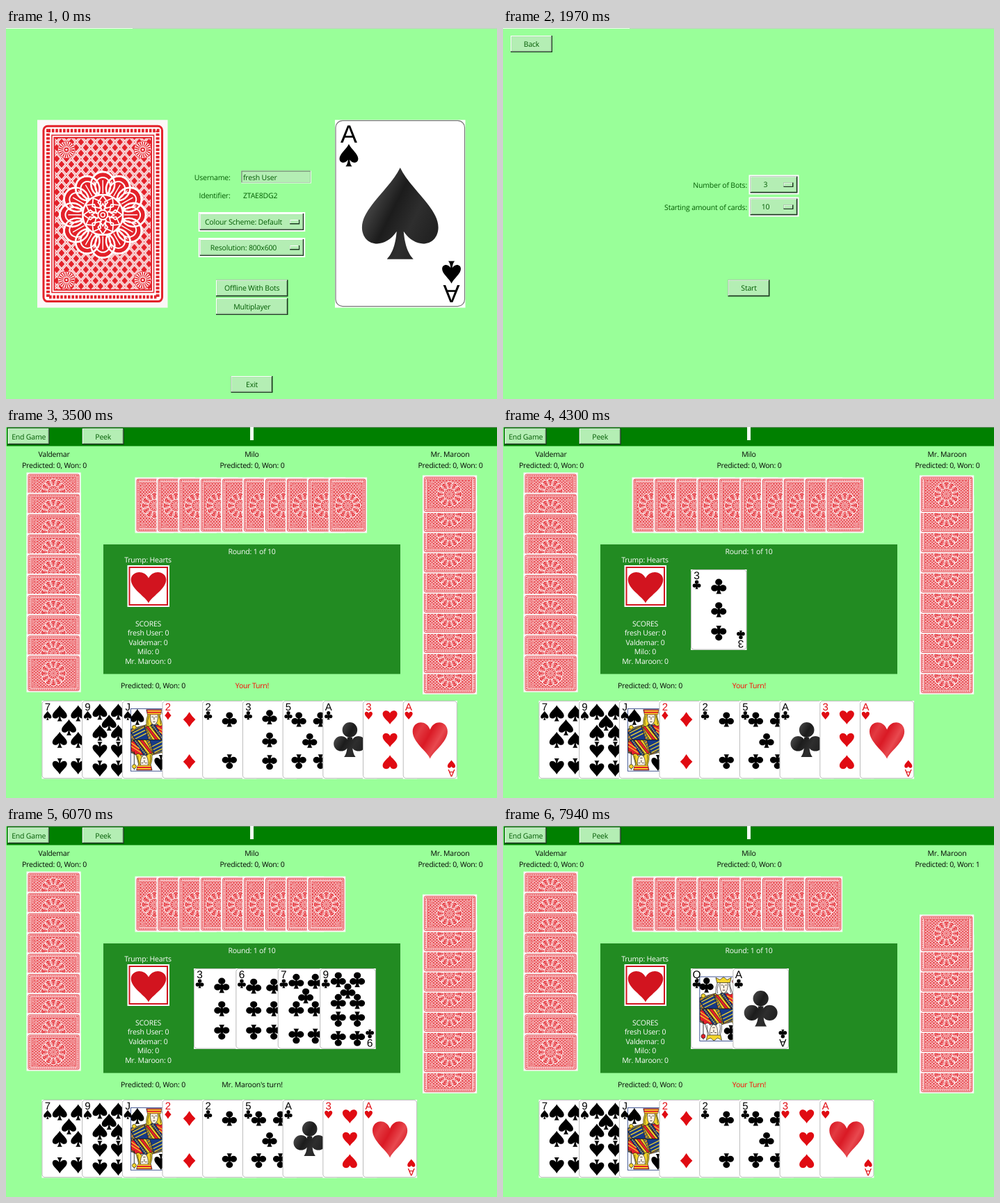
An HTML page for the animation above (8000 ms loop, 706x534 px).

```html
<!DOCTYPE html>
<html lang="en">
<head>
<meta charset="utf-8">
<title>Card game</title>
<style>
  html, body { margin: 0; width: 100%; height: 100%; overflow: hidden; background: #9f9; }
  svg { display: block; width: 706px; height: 534px; }
  text { font: 10.5px "Open Sans", "Noto Sans", sans-serif; letter-spacing: -.2px; text-rendering: geometricPrecision; }
  .rank { font: 36px "Liberation Sans", Arial, sans-serif; letter-spacing: 0; }
  .scene { visibility: hidden; animation: 8s step-end infinite; }
</style>
</head>
<body>
<svg id="stage" viewBox="0 0 706 534"></svg>
<script>
const LOOP = 8000;
const INK = '#005a00', FACE = '#b4eeb4', EDGE = '#1c3a20', RED = '#e3222a';
const YOU = 'fresh User', LEFT = 'Valdemar', TOP = 'Milo', RIGHT = 'Mr. Maroon';

const range = n => [...Array(n).keys()];
const rect = (x, y, w, h, fill, more = '') =>
  `<rect x="${x}" y="${y}" width="${w}" height="${h}" fill="${fill}" ${more}/>`;
const path = (d, fill, more = '') => `<path d="${d}" fill="${fill}" ${more}/>`;
const circle = (x, y, r, fill, more = '') => `<circle cx="${x}" cy="${y}" r="${r}" fill="${fill}" ${more}/>`;
const line = (color, width) => `stroke="${color}" stroke-width="${width}"`;
const text = (x, y, s, fill = INK, anchor = 'middle') =>
  `<text x="${x}" y="${y}" fill="${fill}" text-anchor="${anchor}">${s}</text>`;
const use = (id, transform, fill = '') =>
  `<use href="#${id}" transform="${transform}"${fill && ` fill="${fill}"`}/>`;

// Suits, about 110 units wide and centred on the origin
const SUITS = {
  S: 'M0-66C14-36 55-8 55 20C55 46 24 54 5 26C7 48 12 58 19 66H-19C-12 58-7 48-5 26C-24 54-55 46-55 20C-55-8-14-36 0-66Z',
  H: 'M0 60C-8 38-55 8-55-26C-55-58-14-66 0-32C14-66 55-58 55-26C55 8 8 38 0 60Z',
  D: 'M0-62Q18-28 46 0Q18 28 0 62Q-18 28-46 0Q-18-28 0-62Z',
  C: 'M-26-34a26 26 0 1 1 52 0a26 26 0 1 1-52 0ZM-56 14a26 26 0 1 1 52 0a26 26 0 1 1-52 0Z' +
     'M4 14a26 26 0 1 1 52 0a26 26 0 1 1-52 0ZM-9-8H9C7 35 12 50 20 60H-20C-12 50-7 35-9-8Z'
};

// Rows of pips: [height, half spread]; a zero spread is a single pip
const PIPS = {
  2: [[.24, 0], [.78, 0]],
  3: [[.21, 0], [.5, 0], [.79, 0]],
  5: [[.24, .2], [.51, 0], [.78, .2]],
  6: [[.22, .18], [.5, .18], [.79, .18]],
  7: [[.16, .17], [.34, 0], [.5, .17], [.84, .17]],
  9: [[.14, .17], [.28, 0], [.41, .17], [.63, .17], [.87, .17]]
};

const pips = (rank, suit) => PIPS[rank].map(([v, s]) => (s ? [-s, s] : [0]).map(dx =>
  use(suit, `translate(${94 + dx * 188} ${v * 271}) scale(.46 ${v > .6 ? -.42 : .42})`)).join('')).join('');

function court(rank, suit) {
  const queen = rank === 'Q', gold = '#f4d52c', navy = '#173a86', outline = line('#111', 1.5);
  const half = `<g>
    ${path('M30 136V98L82 84H138L157 92V136Z', 'url(#brocade)', outline)}
    ${path('M30 110L78 88L92 136H46Z', navy, outline)}
    ${path('M108 86L138 82L157 100V130L124 136Z', RED, outline)}
    ${path('M78 86L94 82L136 136H106Z', gold, outline)}
    ${path('M82 90L90 88L128 136H116Z', RED, outline)}
    ${path('M100 84L112 82L150 136H138Z', navy, outline)}
    ${path('M106 86L144 136', 'none', line(gold, 3) + ' stroke-dasharray="4 3"')}
    ${path('M36 112L76 92M40 122L80 102M46 132L84 113', 'none', line(gold, 3))}
    ${path('M122 92L157 114M128 106L157 126', 'none', line(gold, 3))}
    ${path('M90 46Q82 66 84 86Q98 94 104 78L122 80Q130 94 140 84Q133 64 130 46Z', queen ? '#fff' : gold, outline)}
    ${path('M93 52Q86 70 90 84M128 52Q134 70 134 82', 'none', outline)}
    ${path('M98 46Q95 80 111 84Q127 78 124 46Z', '#fff3e4', outline)}
    ${path('M102 56h6M115 56h6M111 57v9M107 73h8', 'none', line('#222', 2))}
    ${queen ? path('M88 48L84 31L98 38L110 29L122 38L136 31L132 48Z', gold, outline)
            : path('M88 48L84 31H138L134 48Z', RED, outline) + path('M88 45H135M88 36H136', 'none', line(gold, 4))}
    ${path('M146 32V96', 'none', line('#111', 2))}
    ${circle(146, 44, 7, queen ? RED : gold, outline)}${circle(42, 92, 7, gold, outline)}
    ${use(suit, 'translate(53 56) scale(.42)')}
  </g>`;
  return half + `<g transform="rotate(180 94 136)">${half}</g>` +
    rect(30, 28, 128, 216, 'none', line('#223a80', 2));
}

function face(id) {
  const [suit, rank] = id, red = 'HD'.includes(suit);
  const corner = `<text class="rank" x="20" y="33" text-anchor="middle">${rank}</text>` +
    use(suit, 'translate(20 51) scale(.245)');
  const middle = rank === 'A'
    ? use(suit, `translate(94 135) scale(${red ? 1.1 : 1})`, `url(#${red ? 'ruby' : 'coal'})`)
    : PIPS[rank] ? pips(rank, suit) : court(rank, suit);
  return `<g id="${id}" fill="${red ? '#e00b12' : '#000'}">${rect(0, 0, 188, 271, '#fff')}
    ${rect(1, 1, 186, 268, 'none', `rx="10" ${line('#777', 1.2)}`)}
    ${middle}${corner}<g transform="rotate(180 94 135.5)">${corner}</g></g>`;
}

function cardBack() {
  const white = w => line('#fff', w);
  const ring = (n, shape) => range(n).map(i => `<g transform="rotate(${i * 360 / n})">${shape}</g>`).join('');
  const oval = (y, rx, ry, fill, w) => `<ellipse cy="${y}" rx="${rx}" ry="${ry}" fill="${fill}" ${white(w)}/>`;
  const medal = ([x, y]) => circle(x, y, 12.5, '#fff', line(RED, 1)) +
    circle(x, y, 8, 'none', line(RED, 7) + ' stroke-dasharray="1.4 1.2"') +
    circle(x, y, 3.5, RED) + circle(x, y, 1.5, '#fff');
  return `<g id="back">${rect(0, 0, 188, 271, '#fbf7f7')}
    ${rect(9, 9, 171, 253, '#fff', `rx="6" ${line(RED, 3)}`)}
    ${rect(15.5, 15.5, 158, 240, 'none', line(RED, 5) + ' stroke-dasharray="3.6 1.8"')}
    ${rect(21, 22, 147, 227, '#fff', line(RED, 1.5))}
    ${rect(24.5, 25.5, 140, 220, 'url(#lattice)', line(RED, 2))}
    ${[[42, 43], [152, 43], [42, 231], [152, 231]].map(medal).join('')}
    <g transform="translate(94.5 137)">${circle(0, 0, 54, RED)}
      ${ring(12, oval(-44, 17, 18, RED, 2.5))}${circle(0, 0, 46, RED)}
      ${ring(12, oval(-44, 17, 18, 'none', 2.5))}${ring(12, oval(-41, 11, 13, 'none', 2))}
      ${ring(24, path('M0-50V-31', 'none', white(1.5)))}
      ${circle(0, 0, 29, RED, white(2.5))}${ring(12, path('M0-28L7-18L0-9L-7-18Z', 'none', white(1.8)))}
      ${ring(8, path('M0-16L5-8L0-5L-5-8Z', RED, white(1.8)))}
      ${circle(0, 0, 7, RED, white(2))}${circle(0, 0, 3, 'none', white(1.5))}
    </g></g>`;
}

function defs() {
  const cards = 'S7 S9 SJ SA D2 C2 C3 C5 C6 C7 C9 CQ CA H3 HA'.split(' ');
  const gradient = (id, ...colors) => `<linearGradient id="${id}" x2="1" y2=".6">` + colors.map((c, i) =>
    `<stop offset="${i / (colors.length - 1)}" stop-color="${c}"/>`).join('') + '</linearGradient>';
  return `<defs>
    ${gradient('coal', '#333', '#444', '#1c1c1c', '#2e2e2e', '#222')}
    ${gradient('ruby', '#d8101c', '#e23a41', '#da1a25', '#e8494f', '#d4141f')}
    <pattern id="lattice" width="14" height="16" patternUnits="userSpaceOnUse">${rect(0, 0, 14, 16, RED)}
      ${path('M0 0L14 16M14 0L0 16', 'none', line('#fff', 3.6))}
      ${path('M0 0L14 16M14 0L0 16', 'none', line(RED, .7))}</pattern>
    <pattern id="brocade" width="9" height="9" patternUnits="userSpaceOnUse" patternTransform="rotate(-35)">
      ${rect(0, 0, 9, 9, '#f4d52c')}${rect(0, 0, 9, 3, '#173a86')}${rect(0, 5, 5, 2, RED)}${rect(6, 4, 1.5, 4, '#111')}</pattern>
    ${Object.entries(SUITS).map(([id, d]) => `<path id="${id}" d="${d}"/>`).join('')}
    ${cards.map(face).join('')}${cardBack()}</defs>`;
}

const card = (id, x, y, w) => use(id, `translate(${x} ${y}) scale(${w / 188})`);
const sideBack = y => use('back', `translate(107.7 ${y}) rotate(90) scale(.2886)`);
const click = (x, y) => circle(x, y, 13, '#f00', 'opacity=".55"') + circle(x, y, 7, '#fa0012');

function button(x, y, w, h, label, down) {
  const [dark, light] = down ? ['#fff', '#666'] : [EDGE, '#fff'];
  return rect(x, y, w, h, dark) + rect(x, y, w - 1.5, h - 1.5, light) +
    rect(x + 1.2, y + 1.2, w - 2.7, h - 2.7, down ? '#f0f0f0' : '#8db98d') +
    rect(x + 1.2, y + 1.2, w - 3.5, h - 3.5, down ? '#f0f0f0' : FACE) +
    text(x + w / 2 + (down ? 1 : 0), y + h / 2 + 3.7, label, down ? '#000' : INK);
}

function menu(x, y, w, label) {
  const r = x + w;
  return rect(x, y, w, 28, '#fff') + button(x + 2, y + 2, w - 4, 24, '') +
    rect(r - 22, y + 11, 14, 6.5, EDGE) + rect(r - 22, y + 11, 12.5, 5, '#fff') +
    rect(r - 21, y + 12, 11.5, 4, FACE) + text(x + (w - 24) / 2, y + 17.8, label);
}

const backdrop = () => rect(0, 0, 706, 534, '#9f9') + rect(0, 0, 182, 1, '#f4f8f4') + rect(182, 0, 524, 1.2, '#c4cfc4');

const home = down => backdrop() + card('back', 45, 132.3, 187.5) + card('SA', 473, 132.3, 187.5) +
  text(322.5, 219, 'Username:', INK, 'end') + rect(338.3, 205.5, 100.5, 18, '#fff') +
  rect(338.3, 205.5, 99.5, 17, '#6c826c') + rect(339.5, 206.7, 98.1, 15.6, FACE) + text(341, 219, YOU, INK, 'start') +
  text(322.5, 245, 'Identifier:', INK, 'end') + text(341, 245, 'ZTAE8DG2', INK, 'start') +
  menu(276.7, 265, 153.5, 'Colour Scheme: Default') + menu(276.7, 302, 153.5, 'Resolution: 800x600') +
  button(302, 362.5, 103.5, 24, 'Offline With Bots', down) + button(302, 389, 103.5, 24, 'Multiplayer') +
  button(323.5, 501, 60, 24, 'Exit') + (down ? click(370, 375) : '');

function setup(down) {
  const d = down ? 1 : 0;
  return backdrop() + button(11 + d, 11, 60, 24, 'Back') +
    text(351 - d, 229.8 - d, 'Number of Bots:', INK, 'end') + menu(353.5 - d, 211.5 - d, 72, '3') +
    text(351 - d, 261.8 - d, 'Starting amount of cards:', INK, 'end') + menu(353.5 - d, 243.5 - d, 72, '10') +
    button(323.5, 362.5, 60, 24, 'Start', down) +
    (down ? rect(0, 533, 706, 1, '#6fae6f') + click(370, 375) : '');
}

function board({ hand, table = '', left = 9, top = 9, right = 10, won = 0, turn, dot }) {
  const list = s => s.split(' ').filter(Boolean);
  const tally = (x, y, n = 0) => text(x, y, `Predicted: 0, Won: ${n}`, '#000');
  const scores = ['SCORES', ...[YOU, LEFT, TOP, RIGHT].map(n => n + ': 0')];
  return rect(0, 0, 706, 534, '#9f9') + rect(1, 0, 705, 27.5, '#008000') + rect(1, 0, 705, 1, '#6a8a6a') +
    rect(351, 0, 5, 19, '#f2fbf2') +
    button(2.7, 2.2, 60, 23.3, 'End Game') + button(109.7, 2.2, 60, 23.3, 'Peek') +
    text(69, 42.5, LEFT, '#000') + tally(69.5, 58.8) +
    text(353.5, 42.5, TOP, '#000') + tally(354, 58.8) +
    text(638.5, 42.5, RIGHT, '#000') + tally(639, 58.8, won) +
    range(left).map(i => sideBack(65.5 + i * 29.1)).join('') +
    range(top).map(i => card('back', 185.5 + i * 30.9, 72.5, 55.5)).join('') +
    `<g transform="translate(569.5)">${range(right).map(i => sideBack(330.5 - i * 29)).join('')}</g>` +
    rect(140, 169, 427, 186.5, '#228b22') + text(353.5, 183, 'Round: 1 of 10', '#fff') +
    text(204, 195.3, 'Trump: Hearts', '#fff') + rect(174.5, 199, 60.5, 60, '#fff') +
    rect(177.5, 202, 54.5, 54, '#fff', line('#d2141f', 2)) +
    use('H', 'translate(205 230) scale(.46 .39)', '#d2141f') +
    scores.map((s, i) => text(204.5, 287 + i * 13.4, s, '#fff')).join('') +
    list(table).map((id, i) => card(id, 270 + i * 60.4, 205, 80.5)).join('') +
    tally(211.5, 376) + text(354, 376, turn || 'Your Turn!', turn ? '#000' : '#f00') +
    list(hand).map((id, i) => card(id, 51.5 + i * 57.7, 394, 78)).join('') +
    (dot ? click(dot, 450) : '');
}

const deal = 'S7 S9 SJ D2 C2 C3 C5 CA H3 HA', second = deal.replace('C3 ', ''), third = second.replace('CA ', '');
const opening = { hand: deal, left: 10, top: 10 };
const reply = { hand: second, table: 'CQ', right: 8, won: 1 };
const scenes = [
  [0, home(false)],
  [470, home(true)],
  [970, setup(false)],
  [3000, setup(true)],
  [3500, board(opening)],
  [4200, board({ ...opening, dot: 370 })],
  [4300, board({ ...opening, hand: second, table: 'C3' })],
  [4800, board({ hand: second, table: 'C3 C6', top: 10, turn: LEFT + "'s turn!" })],
  [5400, board({ hand: second, table: 'C3 C6 C7', turn: TOP + "'s turn!" })],
  [6070, board({ hand: second, table: 'C3 C6 C7 C9', right: 9, turn: RIGHT + "'s turn!" })],
  [6740, board({ ...reply, turn: RIGHT + "'s turn!" })],
  [7370, board(reply)],
  [7840, board({ ...reply, dot: 427 })],
  [7940, board({ ...reply, hand: third, table: 'CQ CA' })]
];

const percent = t => t / LOOP * 100 + '%';
const frames = scenes.map(([start], i) => {
  const end = i + 1 < scenes.length ? scenes[i + 1][0] : LOOP;
  return `@keyframes scene${i} { 0% { visibility: hidden } ${percent(start)} { visibility: visible } ${percent(end)} { visibility: hidden } }`;
});
document.getElementById('stage').innerHTML = `<style>${frames.join('\n')}</style>` + defs() +
  scenes.map(([, art], i) => `<g class="scene" style="animation-name:scene${i}">${art}</g>`).join('');
</script>
</body>
</html>
```
